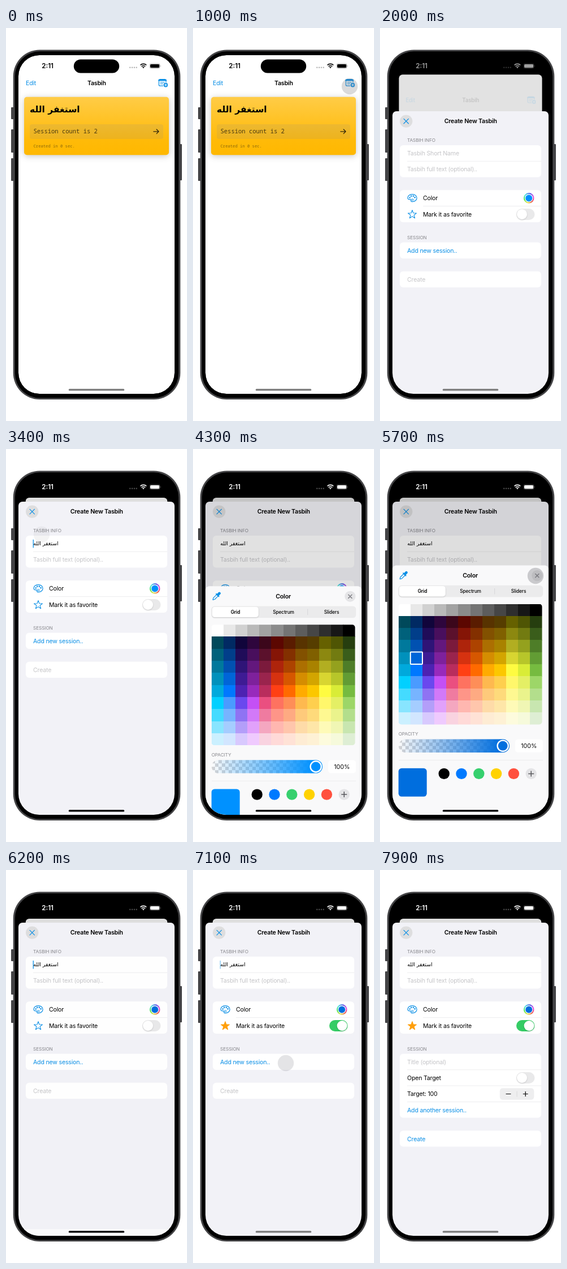
These frames come from a looping animation (320 px wide and 694 px high, 8000 ms). An HTML page:

```html
<!DOCTYPE html>
<html lang="en">
<head>
<meta charset="utf-8">
<title>Counter app</title>
<style>
  html, body { margin: 0; width: 100%; height: 100%; overflow: hidden; background: #fff; }
  svg { display: block; width: 100vw; height: 100vh; }
  text { font: 400 10.6px Inter, "Noto Sans", sans-serif; letter-spacing: -.2px; white-space: pre; }
  .bold { font-weight: 600; }
  .mid { text-anchor: middle; }
  .head { font-size: 8.2px; letter-spacing: -.1px; fill: #86868b; }
  .seg { font-size: 8.3px; font-weight: 500; letter-spacing: -.1px; text-anchor: middle; }
  .mono { font: 10.5px "Noto Sans Mono", "DejaVu Sans Mono", monospace; letter-spacing: 0; }
  .ar { font-family: "DejaVu Sans", sans-serif; letter-spacing: 0; }
  .hint { fill: #c5c5c8; }
  .link { fill: #0a8fe6; }
  .box { fill: #fff; }
  .rule { stroke: #e6e6e9; stroke-width: .7; }
  .blue { fill: none; stroke: #0a8fe6; stroke-width: 1.2; stroke-linecap: round; stroke-linejoin: round; }
  .card { filter: drop-shadow(0 2px 6px rgba(0, 0, 0, .22)); }
  .knob { fill: #fff; filter: drop-shadow(0 1px 1px rgba(0, 0, 0, .16)); }
</style>
</head>
<body>
<svg viewBox="0 0 320 694">
  <defs>
    <clipPath id="screen"><rect x="22" y="48" width="276" height="598" rx="37"/></clipPath>
    <clipPath id="gridClip"><rect x="32.7" y="273.5" width="253.8" height="213" rx="5"/></clipPath>
    <linearGradient id="amber" x2="0" y2="1">
      <stop stop-color="#ffcc47"/><stop offset=".75" stop-color="#ffba08"/><stop offset="1" stop-color="#ffb800"/>
    </linearGradient>
    <linearGradient id="fade">
      <stop id="fadeA" stop-opacity="0"/><stop id="fadeB" offset=".92"/>
    </linearGradient>
    <pattern id="check" x="33" y="512.5" width="12" height="12" patternUnits="userSpaceOnUse">
      <path d="M0 0h12v12H0z" fill="#fbfbfb"/><path d="M0 0h6v6H0zM6 6h6v6H6z" fill="#d3d3d5"/>
    </pattern>
  </defs>

  <g fill="#444446">
    <rect x="9" y="140" width="5" height="21" rx="1"/>
    <rect x="9" y="179" width="5" height="41" rx="1"/>
    <rect x="9" y="230" width="5" height="40" rx="1"/>
    <rect x="306" y="205" width="5" height="64" rx="1"/>
    <rect x="12.7" y="38.5" width="295.6" height="617.5" rx="47"/>
  </g>
  <rect x="15.8" y="41.3" width="289.4" height="612" rx="44"/>

  <g clip-path="url(#screen)">
    <rect x="22" y="48" width="276" height="598"/>

    <g id="home">
      <rect id="homeBg" x="22" y="48" width="276" height="598"/>
      <g id="homeBody">
        <text class="link" x="35" y="100.8">Edit</text>
        <text class="bold mid" x="160.3" y="100.8">Tasbih</text>
        <g class="blue">
          <rect x="270.3" y="90.6" width="12.6" height="11.6" rx="2"/>
          <path d="M270.5 92.2h12.2" stroke-width="2.6"/>
          <path d="M273 96h7M273 98.7h4.5" stroke-width="1"/>
          <circle cx="282.4" cy="100.6" r="4.3" fill="#0a8fe6" stroke="#fff" stroke-width=".9"/>
          <path d="M280.4 100.6h4M282.4 98.6v4" stroke="#fff" stroke-width="1"/>
        </g>
        <rect class="card" x="32" y="121.8" width="256" height="102.4" rx="5" fill="url(#amber)"/>
        <text class="ar" x="42" y="149" style="font-size:15.5px;font-weight:700">استغفر الله</text>
        <rect x="42" y="170" width="236" height="26" rx="4" fill="#86868b" opacity=".15"/>
        <text class="mono" x="48.5" y="186.4" fill="#4b3a10">Session count is 2</text>
        <path d="M260.8 182.8h9M266.2 179l3.8 3.8-3.8 3.8" fill="none" stroke="#33270a" stroke-width="1.3" stroke-linecap="round" stroke-linejoin="round"/>
        <text class="mono" x="48.5" y="211.2" fill="#8d6a0c" style="font-size:7.2px">Created in 0 sec.</text>
      </g>
    </g>

    <g id="form">
      <rect x="22" y="93" width="276" height="640" rx="7" fill="#f2f2f7"/>
      <circle cx="46.2" cy="110.6" r="11.2" fill="#dededf"/>
      <path class="blue" d="M42 106.4l8.4 8.4M50.4 106.4l-8.4 8.4" stroke-width="1.5"/>
      <text class="bold mid" x="160.3" y="114.4">Create New Tasbih</text>

      <text class="head" x="48" y="147.2">TASBIH INFO</text>
      <rect class="box" x="35" y="153" width="250" height="56.5" rx="6"/>
      <path class="rule" d="M48 181.3H285"/>
      <text class="hint" id="nameHint" x="48" y="170.8">Tasbih Short Name</text>
      <text class="ar" id="name" x="48.3" y="170" style="font-size:9.4px"></text>
      <rect id="caret" x="47.6" y="160" width="1.3" height="14.5" fill="#0a8fe6"/>
      <text class="hint" x="48" y="199">Tasbih full text (optional)..</text>

      <rect class="box" x="35" y="232.3" width="250" height="56.7" rx="6"/>
      <path class="rule" d="M76 260.6H285"/>
      <g class="blue">
        <path d="M57 239.7c-4.6 0-8 2.7-8 6.2 0 2.3 1.9 3.3 3.9 2.9 1.6-.3 2 .5 1.7 1.8-.3 1.500 1 2.200 2.900 2.100 4.300-.1 7.600-2.900 7.600-6.500 0-3.700-3.500-6.500-8.100-6.500z"/>
        <g fill="#0a8fe6" stroke="none">
          <circle cx="52.700" cy="245.500" r="1.300"/><circle cx="55.200" cy="242.800" r="1.300"/>
          <circle cx="58.900" cy="242.700" r="1.300"/><circle cx="61.600" cy="245.200" r="1.300"/>
        </g>
        <circle cx="57.300" cy="249.200" r="1.500" stroke-width=".9"/>
      </g>
      <text x="76" y="250.1">Color</text>
      <g id="ring" fill="none" stroke-width="2"></g>
      <circle class="pick" cx="263.2" cy="246.4" r="6"/>
      <polygon id="star" stroke-width="1.1" stroke-linejoin="round"/>
      <text x="76" y="278.800">Mark it as favorite</text>
      <rect id="track" x="241" y="265" width="32.500" height="20" rx="10"/>
      <circle class="knob" id="thumb" cy="275" r="9"/>

      <text class="head" x="48" y="318.600">SESSION</text>
      <rect class="box" id="list" x="35" y="324.600" width="250" rx="6"/>
      <g id="rows">
        <text class="hint" x="48" y="343">Title (optional)</text>
        <path class="rule" d="M48 352.800H285M48 381H285M48 409.500H285"/>
        <text x="48" y="371.200">Open Target</text>
        <rect x="241" y="357" width="32.500" height="20" rx="10" fill="#e9e9ea"/>
        <circle class="knob" cx="251" cy="367" r="9"/>
        <text x="48" y="399.400">Target: 100</text>
        <rect x="211.800" y="385.200" width="60.500" height="20.600" rx="5" fill="#eeeeef"/>
        <path d="M242 390.500v10" stroke="#d4d4d6" stroke-width=".8"/>
        <path d="M222.600 395.500h8.800M252.800 395.500h8.800M257.200 391.100v8.800" stroke="#000" stroke-width="1.200"/>
      </g>
      <text class="link" id="add" x="48"></text>
      <g id="create">
        <rect class="box" x="35" y="375.800" width="250" height="28.300" rx="6"/>
        <text id="createText" x="48" y="394.200">Create</text>
      </g>
    </g>

    <rect id="dim" x="22" y="80" width="276" height="566"/>

    <g id="picker">
      <rect x="22" y="205.500" width="276" height="560" rx="7" fill="#f9f9fa"/>
      <g transform="translate(41.500 223.300) rotate(45)" fill="#0a8fe6">
        <rect x="-2.300" y="-9.500" width="4.600" height="7" rx="2.300"/>
        <rect x="-4" y="-3.800" width="8" height="2.300" rx="1"/>
        <path class="blue" d="M-1.800-1.500v7.500l1.800 3 1.800-3v-7.500"/>
      </g>
      <text class="bold mid" x="159.600" y="227">Color</text>
      <circle cx="277.800" cy="223.600" r="9.600" fill="#e5e5e7"/>
      <path d="M274.700 220.500l6.200 6.200M280.900 220.500l-6.200 6.200" stroke="#828287" stroke-width="1.500" stroke-linecap="round"/>
      <rect x="32.700" y="240.800" width="255.500" height="20.800" rx="5.500" fill="#ebebec"/>
      <rect class="knob" x="33.800" y="242" width="82" height="18.400" rx="4.500"/>
      <path d="M202.700 246v10.500" stroke="#d0d0d3" stroke-width=".8"/>
      <text class="seg" x="75" y="254.200" style="font-weight:600">Grid</text>
      <text class="seg" x="160" y="254.200">Spectrum</text>
      <text class="seg" x="245" y="254.200">Sliders</text>
      <g id="grid" clip-path="url(#gridClip)" shape-rendering="crispEdges"></g>
      <rect id="chosen" x="53.800" y="358.500" width="21.200" height="21.400" rx="1" fill="none" stroke="#fff" stroke-width="2"/>
      <text class="head" x="32.700" y="506.200">OPACITY</text>
      <rect x="33" y="512.500" width="196" height="23.400" rx="11.700" fill="url(#check)"/>
      <rect x="33" y="512.500" width="196" height="23.400" rx="11.700" fill="url(#fade)"/>
      <circle class="pick" cx="217.200" cy="524.200" r="9.600" stroke="#fff" stroke-width="2.400"/>
      <rect class="box" x="239" y="512.800" width="49" height="23" rx="5"/>
      <text class="mid" x="263.300" y="528" style="letter-spacing:0">100%</text>
      <path class="rule" d="M33 549.500H288"/>
      <rect class="pick" x="32.700" y="563.800" width="50" height="50" rx="5.500"/>
      <g id="dots"></g>
      <path d="M262.200 573.400h10M267.200 568.400v10" stroke="#58585c" stroke-width="1.500"/>
    </g>

    <g id="status">
      <text class="bold" x="63.300" y="71.200" style="font-size:11.600px;letter-spacing:0">2:11</text>
      <g opacity=".3">
        <circle cx="219.300" cy="69.800" r="1.200"/><circle cx="223.100" cy="69.800" r="1.200"/>
        <circle cx="226.900" cy="69.800" r="1.200"/><circle cx="230.700" cy="69.800" r="1.200"/>
      </g>
      <path d="M242.900 71.300l-1.900-2a2.800 2.800 0 0 1 3.800 0z"/>
      <path d="M239.600 67.900a4.800 4.800 0 0 1 6.600 0M237.500 65.500a7.800 7.800 0 0 1 10.800 0" fill="none" stroke="currentColor" stroke-width="1.600"/>
      <rect x="254" y="62.900" width="18.200" height="8.400" rx="2.600" fill="none" stroke="currentColor" stroke-width=".7" opacity=".4"/>
      <rect x="255" y="63.900" width="16.200" height="6.400" rx="1.700"/>
      <path d="M273.200 65.700q1.300 1.400 0 2.800z" opacity=".5"/>
    </g>
    <rect x="119.800" y="55.400" width="80.400" height="24" rx="12"/>
    <rect id="bar" x="110.700" y="637.300" width="98.600" height="3.200" rx="1.600"/>
    <circle id="touch" r="14.200" fill="#6c6c72"/>
  </g>
</svg>
<script>
const LOOP = 8000;
const el = id => document.getElementById(id);
const set = (node, attrs) => { for (const k in attrs) node.setAttribute(k, attrs[k]); };
const add = (parent, tag, attrs) => {
  const node = document.createElementNS("http://www.w3.org/2000/svg", tag);
  set(node, attrs);
  parent.append(node);
};
const mix = (a, b, p) => a + (b - a) * p;
const gray = v => `rgb(${v},${v},${v})`;
const ramp = (t, a, b) => Math.min(1, Math.max(0, (t - a) / (b - a)));
const ease = (t, a, b) => { const p = ramp(t, a, b); return p * p * (3 - 2 * p); };
// Critically damped spring, 0 to 1
const spring = (t, start) => {
  const x = Math.max(0, t - start) * 0.02;
  return 1 - (1 + x) * Math.exp(-x);
};

// Palette: four anchor rows, the rest blended between them
const anchors = [
  [1, "00495b 012a63 11053b 2e063d 3c071b 5c0701 5a1c00 583300 563d00 666100 4f5504 263e0f"],
  [5, "00a9dc 0078ff 4d22b2 982abc b92d5d ff4015 ff6a00 ffab01 fcc700 fefb41 d9ec37 76bb40"],
  [6, "01d0ff 4a9bff 6a48ee c450f5 ea4f80 fe7260 fe8e58 feb94f fecf4e fff76b e4ef65 9dd668"],
  [9, "cbf0ff d2e6ff d8c9fe efcafe f9d3e0 ffdad8 ffe2d6 feecd4 fef1d5 fdfbdd f6fadb deeed4"]
].map(([row, s]) => [row, s.split(" ").map(h => [0, 2, 4].map(i => parseInt(h.slice(i, i + 2), 16)))]);

function cellColor(row, col) {
  if (!row) return gray(Math.round(255 * (1 - col / 11)));
  const k = row <= 5 ? 0 : row === 6 ? 1 : 2;
  const [r0, a] = anchors[k], [r1, b] = anchors[k + 1];
  return `rgb(${a[col].map((v, i) => Math.round(mix(v, b[col][i], (row - r0) / (r1 - r0))))})`;
}
for (let r = 0; r < 10; r++)
  for (let c = 0; c < 12; c++)
    add(el("grid"), "rect", { x: 32.7 + c * 21.15, y: 273.5 + r * 21.3, width: 21.3, height: 21.5, fill: cellColor(r, c) });

["#000", "#007aff", "#36d06e", "#ffd200", "#ff503e", "#e4e4e6"].forEach((fill, i) =>
  add(el("dots"), "circle", { cx: 113.2 + i * 30.8, cy: 573.4, r: 9.7, fill }));

for (let i = 0; i < 36; i++) {
  const p = a => `${263.2 + 8.2 * Math.cos(a)} ${246.4 + 8.2 * Math.sin(a)}`;
  const a = i * Math.PI / 18;
  add(el("ring"), "path", { d: `M${p(a)}L${p(a + .2)}`, stroke: `hsl(${(i * 10 + 320) % 360} 75% 60%)` });
}

set(el("star"), {
  points: Array.from({ length: 10 }, (_, i) => {
    const a = i * Math.PI / 5 - Math.PI / 2, r = i % 2 ? 3.2 : 7.8;
    return `${57 + r * Math.cos(a)},${275.4 + r * Math.sin(a)}`;
  }).join(" ")
});

// x, y, start, end, strength
const taps = [
  [277, 103, 900, 1300, .25],
  [60, 152, 2300, 2700, .22],
  [63, 151, 3050, 3470, .22],
  [259, 245, 3720, 4120, .25],
  [64, 369, 4900, 5300, .3],
  [275, 224, 5520, 5960, .33],
  [262, 275, 6420, 6820, .25],
  [164, 341, 6960, 7370, .18]
];
const phrase = "استغفر الله";
const parts = Object.fromEntries(["home", "homeBg", "homeBody", "form", "nameHint", "name", "caret", "star", "track",
  "thumb", "list", "rows", "add", "create", "createText", "dim", "picker", "chosen", "status", "bar", "touch",
  "fadeA", "fadeB"].map(id => [id, el(id)]));
const picks = document.querySelectorAll(".pick");

function draw(t) {
  const $ = parts;

  const open = spring(t, 1805);
  set($.home, { transform: `translate(160 ${48 + 38 * open}) scale(${1 - .092 * open}) translate(-160 -48)` });
  set($.homeBg, { rx: mix(37, 7, ramp(open, 0, .6)), fill: gray(Math.round(255 - 32 * open)) });
  set($.homeBody, { opacity: 1 - .97 * open });
  set($.form, { transform: `translate(0 ${553 * (1 - open)})` });
  const ink = gray(Math.round(255 * ramp(t, 1800, 2120)));
  set($.status, { fill: ink, color: ink });

  const typed = Math.floor(ramp(t, 2500, 3080) * phrase.length);
  $.name.textContent = phrase.slice(0, typed);
  set($.nameHint, { opacity: typed ? 0 : 1 });
  const focus = (t > 2400 && t < 4150) || (t > 6150 && t < 7650);
  const blink = .5 + 1.5 * Math.cos((t - 3350) * Math.PI / 500);
  set($.caret, { opacity: focus ? ramp(blink, 0, 1) : 0 });

  const shown = spring(t, 4095) - spring(t, 5930);
  set($.picker, { transform: `translate(0 ${441 * (1 - shown)})` });
  set($.dim, { opacity: .13 * shown });
  const chosen = t >= 5080;
  const color = chosen ? "#006ede" : "#0091ff";
  picks.forEach(n => set(n, { fill: color }));
  set($.fadeA, { "stop-color": color });
  set($.fadeB, { "stop-color": color });
  set($.chosen, { opacity: chosen ? 1 : 0 });

  const on = ease(t, 6700, 6920);
  const fav = on > .3;
  set($.thumb, { cx: mix(251, 263.6, on) });
  set($.track, { fill: `rgb(${mix(233, 53, on)},${mix(233, 204, on)},${mix(234, 101, on)})` });
  set($.star, { fill: fav ? "#ff9f0a" : "none", stroke: fav ? "#ff9f0a" : "#0a8fe6" });

  const grow = ease(t, 7450, 7680);
  set($.list, { height: 28.3 + 84.7 * grow });
  set($.rows, { opacity: ramp(grow, .4, 1) });
  set($.add, { y: 343.2 + 84.5 * grow });
  $.add.textContent = grow > 0 ? "Add another session.." : "Add new session..";
  set($.create, { transform: `translate(0 ${84.5 * grow})` });
  set($.createText, { fill: grow > .5 ? "#0a8fe6" : "#c5c5c8" });

  const dark = ease(t, 2350, 2650) - ease(t, 6350, 6650);
  set($.bar, { fill: gray(Math.round(122 * (1 - dark))) });

  const tap = taps.find(([, , a, b]) => t >= a && t < b);
  if (tap) {
    const [cx, cy, a, b, strength] = tap;
    set($.touch, { cx, cy, opacity: strength * Math.min(ramp(t, a, a + 100), ramp(b - t, 0, 200)) });
  } else set($.touch, { opacity: 0 });
}

const start = performance.now();
function tick() {
  draw((performance.now() - start) % LOOP);
  requestAnimationFrame(tick);
}
tick();
</script>
</body>
</html>
```
